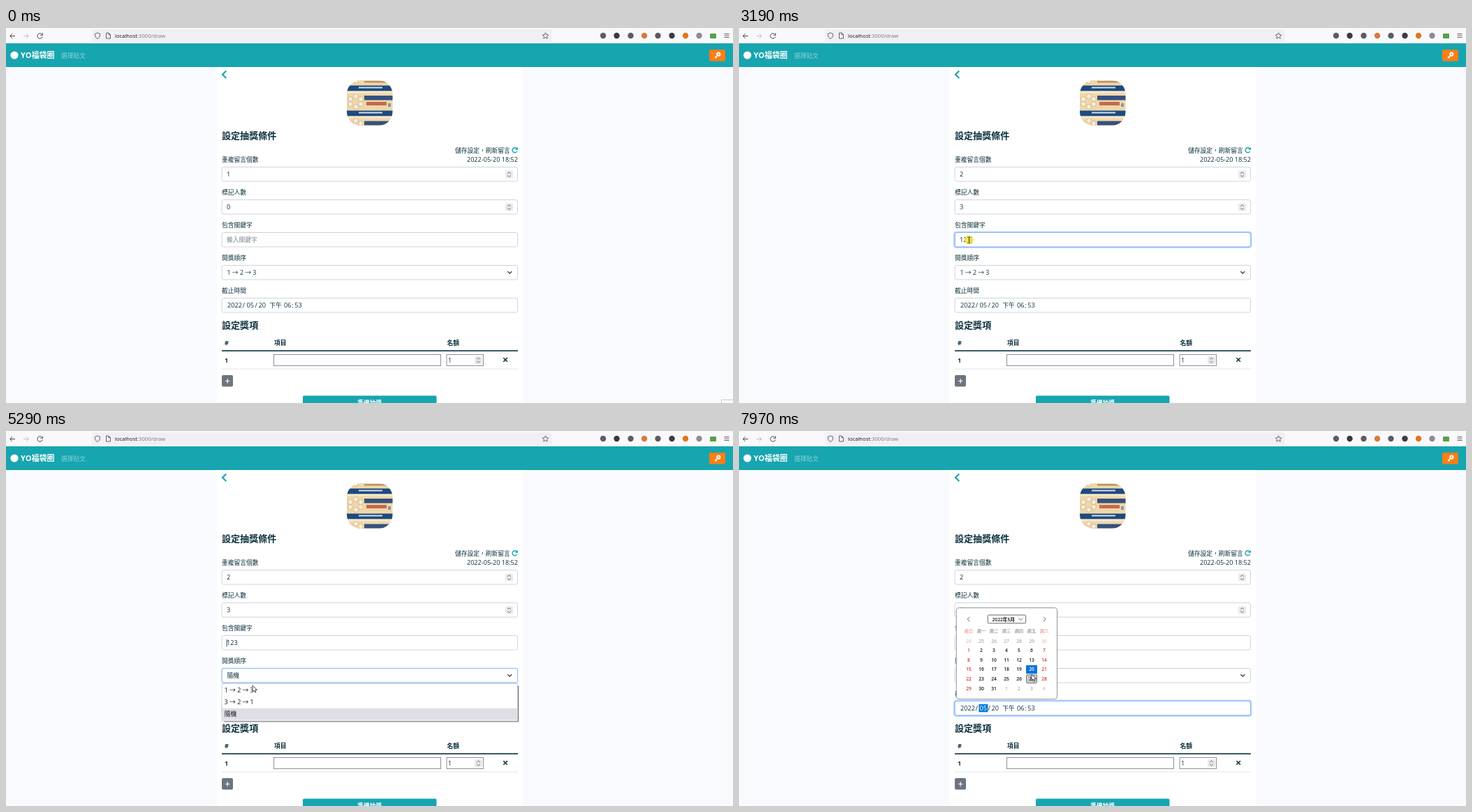
These frames come from a looping animation (1041x538 px, 8000 ms). An HTML page:

```html
<!DOCTYPE html>
<html lang="zh-TW">
<head>
<meta charset="utf-8">
<title>抽獎設定</title>
<style>
  html, body { margin: 0; width: 100%; height: 100%; overflow: hidden; background: #f8fafd; }
  svg { display: block; width: 100%; height: 100%; }
  text { font-family: "Open Sans", "Noto Sans CJK TC", "Noto Sans CJK", sans-serif; white-space: pre; }
</style>
</head>
<body>
<svg viewBox="0 0 1041 538">
  <defs><clipPath id="round"><rect x="488" y="75" width="65.5" height="65" rx="20"/></clipPath></defs>
  <g id="page"></g>
  <g id="live"></g>
</svg>
<script>
const LOOP = 8000, INK = '#0b313d', TEAL = '#17a5b0', BLUE = '#0078d7', EDGE = '#ced4da';
const TOPS = [199.5, 246.5, 293.5, 340.5, 387.5];

const rect = (x, y, w, h, fill, extra = '') =>
  `<rect x="${x}" y="${y}" width="${w}" height="${h}" fill="${fill}" ${extra}/>`;
const dot = (x, y, r, fill, extra = '') => `<circle cx="${x}" cy="${y}" r="${r}" fill="${fill}" ${extra}/>`;
const line = (d, color, width = 1, extra = '') =>
  `<path d="${d}" fill="none" stroke="${color}" stroke-width="${width}" ${extra}/>`;
const text = (x, y, str, size = 8.75, fill = INK, extra = '') =>
  `<text x="${x}" y="${y}" font-size="${size}" fill="${fill}" ${extra}>${str}</text>`;
const BOLD = 'font-weight="700"', MID = 'text-anchor="middle"', END = 'text-anchor="end"';

const spinner = (x, y) => rect(x, y, 11, 11, '#e9e9ed', 'rx="1.5"') +
  line(`M${x + 3.2} ${y + 4.3}l2.3-2.2l2.3 2.2M${x + 3.2} ${y + 6.9}l2.3 2.2l2.3-2.2`, '#55555d', .9);

function browserBar() {
  const addons = [[855, '#5b5b66'], [874.5, '#38383d'], [894.5, '#5b5b62'], [914, '#d9793a'],
    [933.5, '#5b5b66'], [953.5, '#3b3b42'], [973, '#e2761b'], [992.5, '#8c8c94']];
  return rect(0, 0, 1041, 22, '#f9f9fb') + rect(123, 2, 658.5, 18, '#f0f0f4', 'rx="2"') +
    line('M13 11.5H6M9 8.2L5.7 11.5L9 14.8', '#45454d') +
    line('M25 11.5H32M29 8.2L32.3 11.5L29 14.8', '#bdbdc4') +
    line('M51.6 9.2A3.7 3.7 0 1 0 52.2 12.4M52.4 7.4V10.3H49.4', '#45454d') +
    line('M131 7l3.5 1.3v2.5q0 3-3.5 4.7q-3.5-1.7-3.5-4.7v-2.5z', '#55555d', .9) +
    line('M143.5 7h3.5l2.5 2.5v5.5h-6zM147 7v2.5h2.5', '#55555d', .9) +
    text(156, 13.8, 'localhost<tspan fill="#75757d">:3000/draw</tspan>', 7.65, '#15141a') +
    line('M772.5 6.8l1.3 2.8l3 .4l-2.2 2.1l.6 3l-2.7-1.5l-2.7 1.5l.6-3l-2.2-2.1l3-.4z', '#55555d', .9) +
    addons.map(([x, c]) => dot(x, 11, 4.2, c)).join('') + rect(1008, 8, 9, 7, '#55a04c', 'rx="1"') +
    line('M1028.5 8.5h7M1028.5 11h7M1028.5 13.5h7', '#55555d', .9);
}

function thumbnail() {
  const seals = [[501, 98], [493, 102], [508, 102], [493, 109], [508, 109], [501, 113], [501, 133], [493, 137], [508, 137], [501, 76]];
  return `<g clip-path="url(#round)">` + rect(488, 75, 66, 65, '#efd7ab') +
    [82.5, 118.5].map(y => rect(488, y, 66, 8, '#1d4a80') + rect(505, y + 2, 34, 2, '#d5deE8') +
      rect(488, y + 8, 66, 3, '#f6e8cd')).join('') +
    seals.map(([x, y]) => dot(x, y, 3.4, '#f7efe0', 'stroke="#c49a5c" stroke-width=".6"')).join('') +
    rect(513, 97, 41, 6.5, '#34527f') + rect(516, 106, 29, 5, '#c66a4b') + rect(547, 108, 4, 5, '#8398ae') +
    rect(513, 133.5, 41, 6, '#34527f') + rect(513, 76, 34, 2.5, '#bd9468') + '</g>';
}

function page() {
  const labels = ['重複留言個數', '標記人數', '包含關鍵字', '開獎順序', '截止時間'];
  return browserBar() + rect(302, 56, 438, 482, '#fff') + rect(0, 22, 1041, 34, TEAL) +
    dot(12, 39, 5.6, '#fff') + text(21, 43.4, 'YO福袋圈', 11, '#fff', BOLD) +
    text(79, 42.7, '選擇貼文', 8.75, '#8bd2d7') +
    rect(1007, 31, 23, 16.5, '#fd7e14', 'rx="2"') +
    dot(1020.3, 37.6, 2.1, 'none', 'stroke="#fff" stroke-width="2"') + line('M1018.8 39.2l-3.7 3.7M1016 41.6l1.5 1.5', '#fff', 1.6) +
    line('M315.3 61.5L310 66.7L315.3 72', TEAL, 2.1) + thumbnail() +
    text(309, 159.4, '設定抽獎條件', 13.05, INK, BOLD) +
    text(643, 178.5, '儲存設定，刷新留言') +
    line('M731.2 173A3.5 3.5 0 1 0 731.7 176.8', TEAL, 1.4) + `<path d="M733 170.8v4h-4z" fill="${TEAL}"/>` +
    text(733, 191.8, '2022-05-20 18:52', 9.1, INK, END) +
    labels.map((s, i) => text(309, 191.5 + 47 * i, s)).join('') +
    TOPS.map(y => rect(309, y, 423.5, 20.5, '#fff', `rx="2.5" stroke="${EDGE}"`)).join('') +
    spinner(715, 204.5) + spinner(715, 251.5) + line('M718.3 349.2l3 3l3-3', '#343a40', 1.3) +
    text(309, 431.4, '設定獎項', 13.05, INK, BOLD) +
    text(313, 454.7, '#', 9, INK, BOLD) + text(384, 454.7, '項目', 8.75, INK, BOLD) + text(631.5, 454.7, '名額', 8.75, INK, BOLD) +
    rect(309, 462.3, 424, 1.6, INK) + rect(309, 488.6, 424, .9, '#dee2e6') +
    text(313, 479.6, '1', 9, INK, BOLD) +
    rect(383.5, 468.5, 239, 16, '#fff', 'stroke="#8f8f9d"') + rect(631, 468.5, 52.5, 16, '#fff', 'stroke="#8f8f9d"') +
    text(633, 479.7, '1', 9) + spinner(671, 471) +
    line('M712.3 473.2l5.6 5.6M717.9 473.2l-5.6 5.6', INK, 1.6) +
    rect(309, 498, 16, 16.5, '#6c757d', 'rx="2"') + line('M314 506.5h6.4M317.2 503.3v6.4', '#fff', 1.2) +
    rect(425, 527.5, 191.5, 20, TEAL, 'rx="2"') + text(520.7, 541.3, '準備抽獎', 8.75, '#fff', BOLD + MID);
}

// time, x, y
const PATH = [
  [40, 1040, 536], [480, 345, 210], [860, 345, 210], [1000, 244, 213], [1120, 244, 213],
  [1350, 343.5, 264.5], [1450, 343.5, 264.5], [1620, 306, 262], [1680, 306, 262], [1830, 380, 301],
  [2010, 380, 301], [2130, 366, 304], [2200, 366, 304], [2310, 364, 320], [2910, 364, 320],
  [3060, 345, 304], [3150, 345, 304], [3320, 238, 305], [3400, 238, 305], [3620, 386, 370],
  [3750, 384, 346], [4460, 384, 346], [4600, 365, 388], [4800, 345, 405], [4950, 345, 405],
  [5150, 352, 353], [5230, 352, 355], [5290, 353, 365], [5450, 345, 372], [6150, 345, 372],
  [6690, 425, 398], [6820, 425, 398], [7200, 352, 402], [7650, 352, 398], [7900, 419, 349], [8000, 419, 349]
];
const PRESSES = [[500, 560], [880, 1080], [1380, 1640], [2130, 2200], [3060, 3380], [3780, 3840],
  [4880, 4950], [5170, 5230], [6080, 6150], [6700, 6760], [7300, 7370]];
const FOCUS = [[500, 1385], [1385, 2130], [2130, 3700], [3700, 6720], [6720, 9000]];

const clamp = v => Math.max(0, Math.min(1, v));

function pointerAt(t) {
  const i = PATH.findIndex(k => k[0] > t);
  const [t0, x0, y0] = PATH[i - 1], [t1, x1, y1] = PATH[i];
  const u = (t - t0) / (t1 - t0), e = u * u * (3 - 2 * u);
  return [x0 + (x1 - x0) * e, y0 + (y1 - y0) * e];
}

function pointer(t, menuOpen) {
  if (t < 40) return '';
  const [x, y] = pointerAt(t);
  const pressed = PRESSES.some(([a, b]) => t >= a && t < b);
  const row = TOPS.findIndex(top => y >= top && y <= top + 20.5);
  const overField = x > 309 && x < 715;
  const halo = pressed ? dot(x, y, 6.6, '#f3e52c', 'opacity=".75"') : '';
  let shape;
  if ((overField || pressed) && row >= 0 && row < 3)
    shape = line('M-2-4.3h1.4l.6.6l.6-.6h1.4M0-3.7v7.4M-2 4.3h1.4l.6-.6l.6.6h1.4', '#333', .9);
  else if (overField && row === 4 && !menuOpen)
    shape = '<path d="M-1 0q1-1 2 0v4l4 1q1.3.5 1.2 2l-.7 4.5q-.2 1-1 1h-4q-.8 0-1.4-.8l-3-4.2q0-1.3 1.3-.9l1.6 1.2z" fill="#fff" stroke="#222" stroke-width=".9"/>';
  else
    shape = '<path d="M0 0v9l2.1-1.9l1.4 3.1l1.5-.7l-1.4-3h2.9z" fill="#fff" stroke="#222" stroke-width=".8"/>';
  return halo + `<g transform="translate(${x} ${y})">${shape}</g>`;
}

function focusRings(t) {
  return TOPS.map((y, i) => {
    const [a, b] = FOCUS[i];
    const f = Math.min(clamp((t - a) / 150), 1 - clamp((t - b) / 150));
    if (!f) return '';
    const ring = i === 3 ? '' :
      rect(308, y - 1, 425.5, 22.5, 'none', `rx="3.5" stroke="#0d6efd" stroke-width="2.2" opacity="${.27 * f}"`);
    return ring + rect(309, y, 423.5, 20.5, 'none', `rx="2.5" stroke="#86b7fe" opacity="${f}"`);
  }).join('');
}

function fieldValues(t) {
  const on = (a, b) => t >= a && t < b;
  const caret = (x, y) => rect(x, y - 5.2, .8, 10.6, '#222');
  const value = (y, str, selected) => (selected ? rect(315.5, y - 5.5, 5.3 * str.length + 1, 11.5, BLUE) : '') +
    text(316, y + 3.4, str, 9.2, selected ? '#fff' : INK);
  let out = value(210, t < 1150 ? '1' : '2', on(960, 1150)) +
    value(257, t < 1790 ? '0' : '3', on(1560, 1790));
  const typed = '123'.slice(0, Math.max(0, Math.floor((t - 2840) / 70)));
  out += typed ? value(304, typed, on(3200, 3700)) : text(316, 307, '輸入關鍵字', 8.75, '#7d868c');
  if (on(560, 900) || on(1170, 1380)) out += caret(321.3, 210);
  if (on(1385, 1540) || on(1790, 2130)) out += caret(321.3, 257);
  if (on(2130, 2690) || t >= 3200) out += caret(315.8, 304);
  else if (t >= 2910) out += caret(316 + 5.26 * typed.length, 304);
  return out;
}

const ORDERS = ['1 → 2 → 3', '3 → 2 → 1', '隨機'];

function orderMenu(t, open) {
  const chosen = t >= 4950 && t < 6150 ? 2 : 0;
  let out = text(316.5, 354, ORDERS[chosen], 8.8);
  if (!open) return out;
  const hover = t < 4540 ? 0 : t < 4680 ? 1 : t < 5330 ? 2 : 0;
  out += rect(312, 365.5, 422.3, 52, '#85858a', 'rx="1"') +
    rect(309, 362.5, 423.5, 53.5, '#fff', 'stroke="#c6c6cc" stroke-width=".8"') +
    rect(309.3, 363.8 + 17 * hover, 423, 16.8, '#dedee4');
  return out + ORDERS.map((s, i) => text(312.8, 375.3 + 17 * i, s, 8.8, '#15141a')).join('');
}

function deadline(t) {
  const picked = t >= 7300 ? 1 : t >= 6740 ? 4 : -1;
  const parts = [[317, '2022'], [344.6, '05'], [361.4, '20'], [377.3, '下午'], [398, '06'], [413.3, '53']];
  const pickedX = picked === 1 ? 1 : picked === 4 ? 5 : -1;
  return parts.map(([x, s], i) => (i === pickedX ? rect(x - 1.2, 392, 13, 11.3, BLUE) : '') +
    text(x, 401.1, s, i === 3 ? 8.75 : 9.2, i === pickedX ? '#fff' : INK)).join('') +
    text(338.7, 401.1, '/', 9.2) + text(356.5, 401.1, '/', 9.2) + text(409.2, 401.1, ':', 9.2);
}

function calendar(t) {
  let out = rect(311.2, 253.7, 144.4, 131, '#fff', 'rx="4" stroke="#8f8f9d"') +
    line('M330.3 266.8l-3.2 3.2l3.2 3.2M436 266.8l3.2 3.2l-3.2 3.2', '#55555d', .9) +
    rect(356.2, 264, 54.5, 11.8, '#fff', 'rx="1.5" stroke="#66666f"') +
    text(362.5, 272.5, '2022年5月', 6.7, '#15141a', 'font-weight="600"') +
    line('M400.3 268.6l3 3l3-3', '#55555d', .9);
  [...'日一二三四五六'].forEach((d, i) =>
    out += text(329 + 18 * i, 289.4, '週' + d, 6.2, i % 6 ? '#77777f' : '#f08080', MID));
  const [px, py] = pointerAt(t);
  for (let n = 0; n < 42; n++) {
    const col = n % 7, row = Math.floor(n / 7), day = n < 7 ? 24 + n : n - 6;
    const x = 329 + 18 * col, y = 301 + 13.65 * row;
    const outside = n < 7 || day > 31, weekend = col % 6 === 0, chosen = n === 26;
    const hover = !chosen && Math.abs(px - x) < 9 && Math.abs(py - y) < 6.8;
    if (chosen) out += rect(x - 8, y - 6, 16, 12.3, '#0a74dc', 'rx="1"');
    if (hover) out += rect(x - 7.5, y - 5.7, 15, 11.7, '#c9c9cd', 'rx="1" stroke="#77777f"');
    const color = chosen ? '#fff' : weekend ? (outside ? '#f3a0a0' : '#dc3030') : outside ? '#8f8f97' : '#15141a';
    out += text(x, y + 2.5, day > 31 && n > 6 ? day - 31 : day, 6.7, color,
      MID + (outside ? '' : ' font-weight="600"'));
  }
  return out;
}

function draw(t) {
  const open = (t >= 3840 && t < 4950) || (t >= 5240 && t < 6150);
  return (t < 40 ? rect(1024.5, 533.5, 20, 8, '#fff', 'stroke="#c9c9cd"') : '') +
    focusRings(t) + fieldValues(t) + deadline(t) + orderMenu(t, open) +
    // 7650+ the pointer is over the open date picker
    (t >= 7380 ? calendar(t) : '') + pointer(t, open);
}

document.getElementById('page').innerHTML = page();
const live = document.getElementById('live');
const start = performance.now();
function tick() {
  live.innerHTML = draw((performance.now() - start) % LOOP);
  requestAnimationFrame(tick);
}
tick();
</script>
</body>
</html>
```
